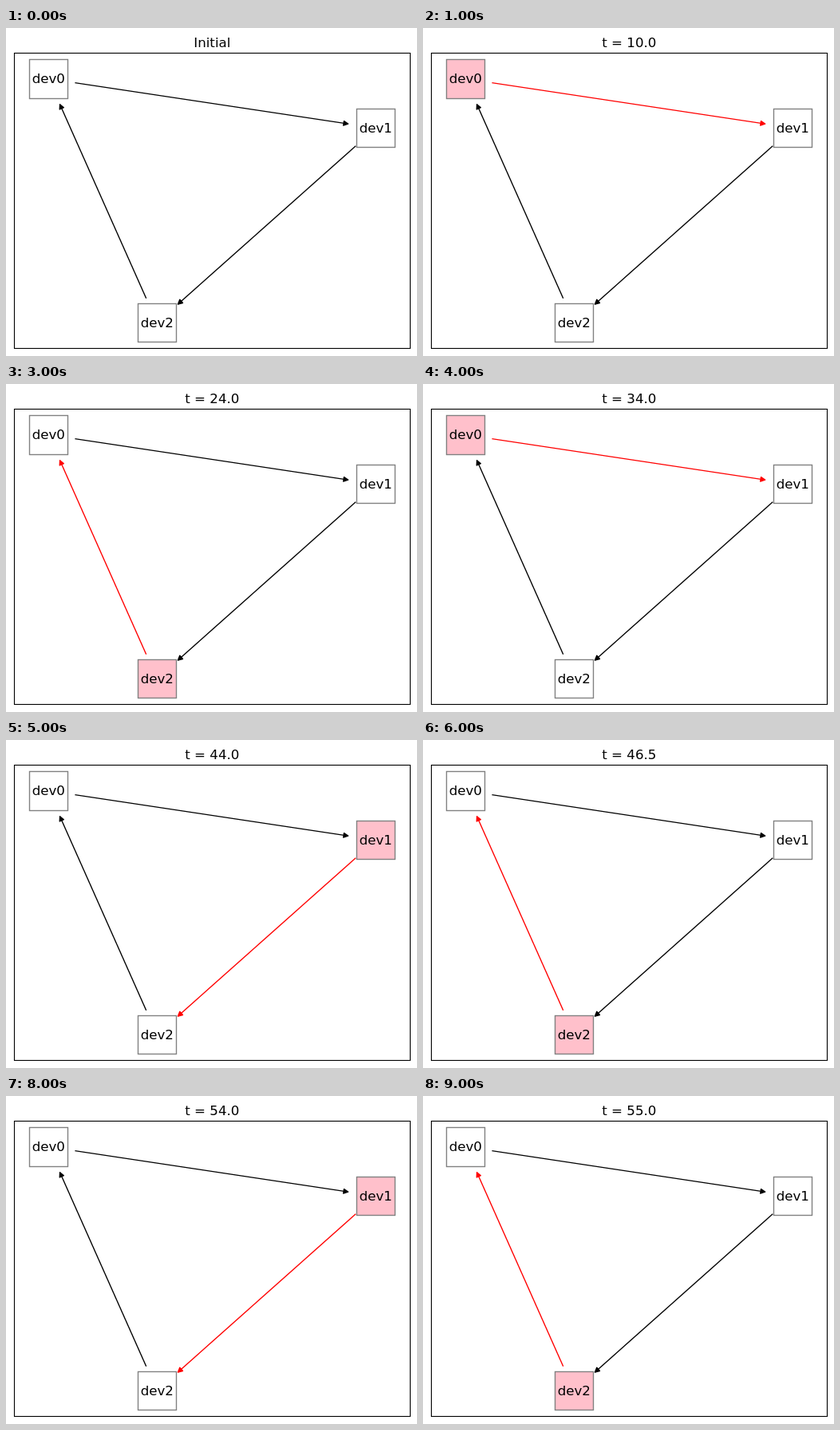
Animation of 515 by 411 pixels, one loop 10000 ms. Source, as an HTML page with a canvas:

```html
<!DOCTYPE html>
<html lang="en">
<head>
<meta charset="utf-8">
<title>Device ring</title>
<style>
html, body { margin: 0; width: 100%; height: 100%; overflow: hidden; background: #fff; }
canvas { display: block; }
</style>
</head>
<body>
<canvas id="stage" width="515" height="411"></canvas>
<script>
const ctx = document.getElementById("stage").getContext("2d");
const STEP = 1000;
const GAP = 33.5;            // distance from a node's centre to its arrow ends
const HEAD = { length: 5.56, half: 2.78, inset: 1.55 };

const nodes = [
  { name: "dev0", x: 29.5, y: 39.5, w: 48, h: 49, cx: 53.3, cy: 63.7, base: 69 },
  { name: "dev1", x: 439.5, y: 101.5, w: 48, h: 48, cx: 463.3, cy: 125.4, base: 131 },
  { name: "dev2", x: 165.5, y: 345.5, w: 48, h: 48, cx: 189.3, cy: 369.4, base: 375 }
];

// Clock reading for each hop around the ring
const clock = [10, 20, 24, 34, 44, 46.5, 51.5, 54, 55];

function drawArrow(from, to, color) {
  const angle = Math.atan2(to.cy - from.cy, to.cx - from.cx);
  const span = Math.hypot(to.cx - from.cx, to.cy - from.cy);
  const tip = span - GAP - HEAD.inset;
  ctx.save();
  ctx.translate(from.cx, from.cy);
  ctx.rotate(angle);
  ctx.strokeStyle = ctx.fillStyle = color;
  ctx.lineWidth = 1.39;
  ctx.lineJoin = "round";
  ctx.beginPath();
  ctx.moveTo(GAP, 0);
  ctx.lineTo(tip, 0);
  ctx.stroke();
  ctx.beginPath();
  ctx.moveTo(tip - HEAD.length, -HEAD.half);
  ctx.lineTo(tip, 0);
  ctx.lineTo(tip - HEAD.length, HEAD.half);
  ctx.closePath();
  ctx.fill();
  ctx.stroke();
  ctx.restore();
}

function drawText(text, x, y) {
  ctx.fillStyle = "#000";
  ctx.fillText(text, x, y);
}

function drawNode(node, fill) {
  ctx.fillStyle = fill;
  ctx.strokeStyle = "#808080";
  ctx.lineWidth = 1.39;
  ctx.fillRect(node.x, node.y, node.w, node.h);
  ctx.strokeRect(node.x, node.y, node.w, node.h);
  drawText(node.name, node.cx, node.base);
}

function draw(step) {
  const active = step ? (step - 1) % nodes.length : -1;
  ctx.fillStyle = "#fff";
  ctx.fillRect(0, 0, 515, 411);
  ctx.font = '16.667px "DejaVu Sans", sans-serif';
  ctx.textAlign = "center";

  nodes.forEach((node, i) =>
    drawArrow(node, nodes[(i + 1) % nodes.length], i === active ? "#f00" : "#000"));
  nodes.forEach((node, i) => drawNode(node, i === active ? "#ffc0cb" : "#fff"));

  ctx.strokeStyle = "#000";
  ctx.lineWidth = 1.11;
  ctx.strokeRect(10.5, 31.5, 496, 370);
  drawText(step ? "t = " + clock[step - 1].toFixed(1) : "Initial", 258.3, 24);
}

const start = performance.now();

function tick() {
  const elapsed = performance.now() - start;
  draw(Math.floor(elapsed / STEP) % (clock.length + 1));
  requestAnimationFrame(tick);
}

tick();
</script>
</body>
</html>
```
